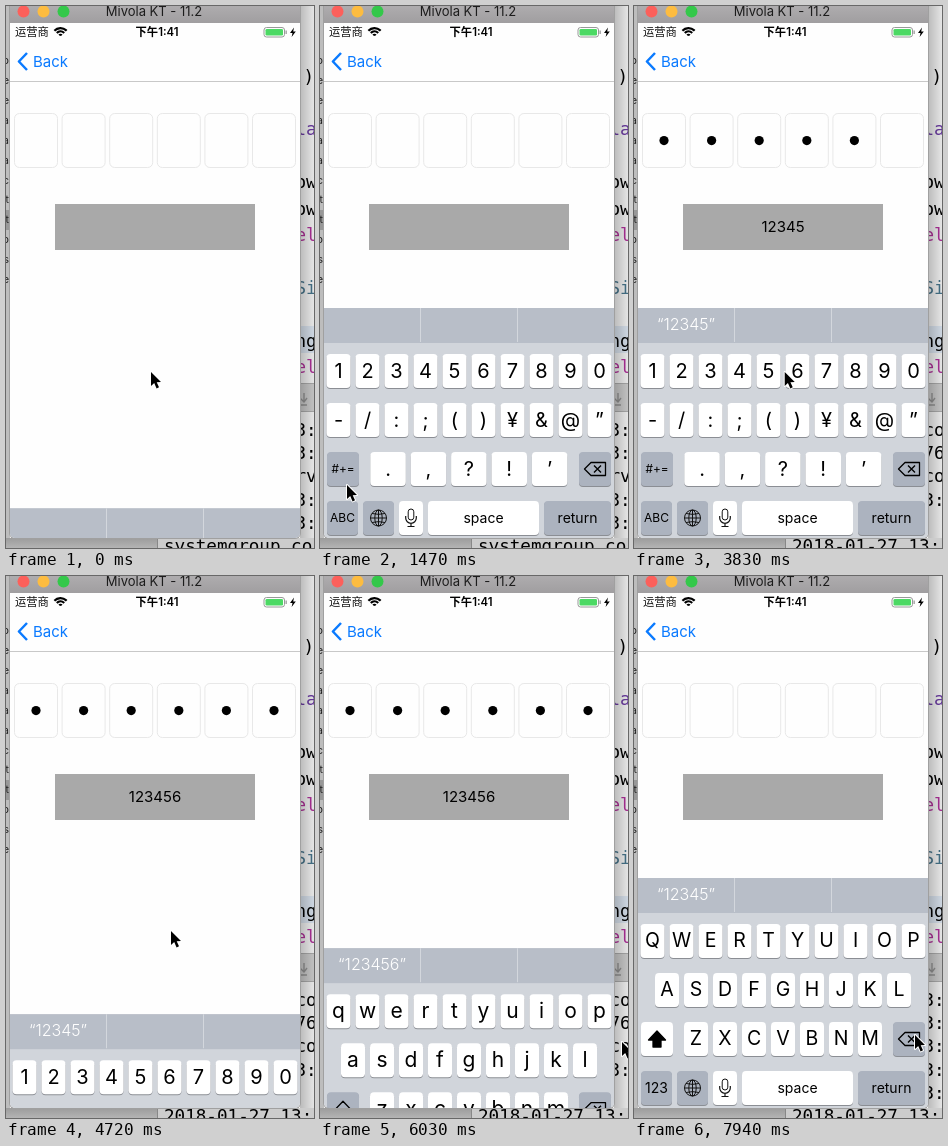
Animation, 308 px wide and 542 px high, one loop 8000 ms. Source, as an HTML page with a canvas:

```html
<!DOCTYPE html>
<html lang="en">
<head>
<meta charset="utf-8">
<title>Passcode field demo</title>
<style>
html, body { margin: 0; width: 100%; height: 100%; overflow: hidden; background: #ddd; }
canvas { display: block; width: 308px; height: 542px; }
</style>
</head>
<body>
<canvas id="stage" width="308" height="542"></canvas>
<script>
const c = document.getElementById('stage').getContext('2d');
const UI = 'Inter, "Noto Sans CJK SC", "Noto Sans CJK", sans-serif';
const MONO = '"DejaVu Sans Mono", monospace';
const LOOP = 8000, STEP = 147.2;
const KEY_TOP = 302, KEY_H = 230;
const ERASE = 6900;                // backspace goes down
const GREY = '#acb3bf';

// time, x, y of the pointer tip
const PATH = [
  [0, 145, 366], [1100, 18, 508], [1472, 27, 479], [1860, 20, 366], [4260, 163, 366],
  [4720, 165, 355], [5290, 150, 172], [5740, 152, 145], [6035, 302, 466], [6450, 281, 459]
];

function text(s, x, y, size, color = '#000', align = 'center', weight = 400, font = UI) {
  c.font = `${weight} ${size}px ${font}`;
  c.textAlign = align;
  c.textBaseline = 'middle';
  c.fillStyle = color;
  c.fillText(s, x, y);
}
function mono(s, x, y, color = '#000') {
  text(s, x, y, 17.6, color, 'left', 400, MONO);
}
function rect(x, y, w, h, color) {
  c.fillStyle = color;
  c.fillRect(x, y, w, h);
}
function round(x, y, w, h, r, fill, line) {
  c.beginPath();
  c.roundRect(x, y, w, h, r);
  if (fill) { c.fillStyle = fill; c.fill(); }
  if (line) stroke(line, 1);
}
function disc(x, y, r, color) {
  c.beginPath();
  c.arc(x, y, r, 0, 7);
  c.fillStyle = color;
  c.fill();
}
function poly(points, close = true) {
  c.beginPath();
  points.forEach(([x, y]) => c.lineTo(x, y));
  if (close) c.closePath();
}
function stroke(color, width) {
  c.strokeStyle = color;
  c.lineWidth = width;
  c.lineJoin = 'round';
  c.stroke();
}
function fade(x0, y0, x1, y1, from, to) {
  const g = c.createLinearGradient(x0, y0, x1, y1);
  g.addColorStop(0, from);
  g.addColorStop(1, to);
  return g;
}
const clamp = (v, lo, hi) => Math.min(hi, Math.max(lo, v));

// One digit per 480 ms going in, one per 150 ms while backspace repeats.
function digitsAt(t) {
  if (t < ERASE) return clamp(Math.floor((t - 1380) / 480), 0, 6);
  return clamp(5 - Math.floor((t - ERASE - 250) / 150), 0, 5);
}
function pointerAt(t) {
  const i = PATH.findIndex(p => p[0] > t);
  if (i < 0) return PATH[PATH.length - 1].slice(1);
  const [t0, x0, y0] = PATH[i - 1], [t1, x1, y1] = PATH[i];
  const p = (t - t0) / (t1 - t0), e = p * p * (3 - 2 * p);
  return [x0 + (x1 - x0) * e, y0 + (y1 - y0) * e];
}
function slide(t, start) {
  return 1 - (1 - clamp((t - start) / 400, 0, 1)) ** 3;
}
function keyboardShift(t) {
  if (t < 4000) return KEY_H * (1 - slide(t, -18));
  if (t < 5400) return KEY_H * slide(t, 4607);
  return KEY_H * (1 - slide(t, 5904.5));
}

function editor() {
  const colors = { la: '#703daa', el: '#b833a1', Si: '#4b7b93' };
  rect(0, 0, 308, 542, '#fff');
  rect(294, 320, 14, 27, '#e4eefa');
  rect(294, 377, 14, 29, '#b4b4b4');
  rect(294, 378, 14, 27, '#d6d6d6');
  ') ,,la,,ow,ow,el,,Si,,ng,el'.split(',').forEach((s, i) =>
    mono(s, s == ') ' ? 297.5 : 289.5, 72 + i * 26.4, colors[s]));
  c.beginPath();
  c.moveTo(298, 387); c.lineTo(298, 395);
  c.moveTo(294, 392); c.lineTo(298, 396); c.lineTo(301, 392);
  c.moveTo(294, 399); c.lineTo(301, 399);
  stroke('#999', 1.4);
}
function consoleLog(t, n) {
  const late = t > 3000;
  const skip = t > ERASE && n < 5 ? Math.min(5, 6 - n) : 0;
  const log = (late ? 'co,76,co,3:,,3:,3:,3:,3:,3:' : '3:,3:,rv,3:,3:').split(',');
  log.slice(skip, skip + 5).forEach((s, i) => mono(s, 289.5, 425 + i * 23.4));
  mono(late ? '2018-01-27 13:' : 'systemgroup.co', 158, 541);
}
function backdrop(t, n) {
  editor();
  consoleLog(t, n);
  rect(294, 0, 14, 532, fade(294, 0, 310, 0, 'rgba(0,0,0,.27)', 'rgba(0,0,0,.08)'));
  rect(152, 532, 156, 10, 'rgba(0,0,0,.2)');
  rect(0, 532, 152, 10, fade(0, 532, 0, 542, '#9c9c9c', '#b4b4b4'));
  rect(151, 532, 1, 10, '#888');
  rect(0, 0, 4, 532, '#bdbdbd');
  rect(0, 204, 4, 20, '#989898');
  [...'peeaaacttbse'].forEach((s, i) => text(s, 3, 55 + i * 19.9, 10.5, '#222', 'right'));
}

function statusBar() {
  text('运营商', 9, 26.5, 11.3, '#111', 'left');
  for (let r = 1.8; r < 9; r += 3.3) {
    c.beginPath();
    c.arc(54.5, 30.5, r, -Math.PI * 0.76, -Math.PI * 0.24);
    stroke('#000', 2.1);
  }
  text('下午1:41', 151, 26.5, 11.3, '#000', 'center', 600);
  round(258, 21.5, 20.5, 9.5, 2.5, null, '#999');
  round(259.5, 23, 17.5, 6.5, 1.3, '#4cd964');
  rect(279.5, 24.5, 1.3, 3.5, '#999');
  poly([[288, 21.5], [284, 27], [286.5, 27], [285.6, 31], [289.8, 25.4], [287.2, 25.4]]);
  c.fillStyle = '#000';
  c.fill();
}

function phone(n) {
  round(3, 0, 292, 533, [0, 0, 6, 6], '#a0a0a0');
  rect(4, 0, 290, 17, fade(0, 0, 0, 17, '#aeacae', '#a09ea0'));
  ['#fc605b', '#fdbc40', '#34c84a'].forEach((color, i) => disc(17.5 + i * 20, 5.5, 6, color));
  text('Mivola KT - 11.2', 148, 6.5, 13, '#1c1c1c');
  round(4, 17, 290, 515, [0, 0, 5, 5], '#fefefe');
  rect(4, 75, 290, 1, '#c8c8c8');
  statusBar();
  poly([[21, 47], [12.9, 55.5], [21, 64]], false);
  stroke('#0a7aff', 2.5);
  text('Back', 27, 56, 15, '#0a7aff', 'left');

  for (let i = 0; i < 6; i++) {
    const x = 8.5 + i * 47.6;
    round(x, 107.5, 43, 54, 5, '#fefefe', '#e8e8e8');
    if (i < n) disc(x + 21.5, 134.6, 4.6, '#000');
  }
  rect(49, 198, 200, 46, '#a9a9a9');
  text('123456'.slice(0, n), 149, 221.5, 15);
}

function key(x, y, w, label, size, fill = '#fff') {
  round(x, y + 1, w, 34, 4, '#8b8e94');
  round(x, y, w, 34, 4, fill);
  if (label) text(label, x + w / 2, y + 17.5, size);
}
function keyRow(keys, row, size) {
  const pitch = 29, x = 149 - keys.length * pitch / 2 + 2.5;
  [...keys].forEach((k, i) => key(x + i * pitch, 348 + row * 49, 24, k, size));
}

function globe(x, y) {
  c.beginPath();
  c.arc(x, y, 8, 0, 7);
  c.moveTo(x + 3.7, y);
  c.ellipse(x, y, 3.7, 8, 0, 0, 7);
  c.moveTo(x, y - 8); c.lineTo(x, y + 8);
  c.moveTo(x - 8, y); c.lineTo(x + 8, y);
  for (const s of [-1, 1]) {
    c.moveTo(x - 6.5, y + 4.5 * s);
    c.quadraticCurveTo(x, y + 2.8 * s, x + 6.5, y + 4.5 * s);
  }
  stroke('#111', 1);
}
function mic(x, y) {
  round(x - 2.8, y - 9, 5.6, 11, 2.8, null, '#111');
  c.beginPath();
  c.moveTo(x - 5.3, y - 2);
  c.arc(x, y, 5.3, Math.PI, 0, true);
  c.lineTo(x + 5.3, y - 2);
  c.moveTo(x, y + 5.3); c.lineTo(x, y + 8.5);
  c.moveTo(x - 3.5, y + 8.5); c.lineTo(x + 3.5, y + 8.5);
  stroke('#111', 1.2);
}
function shiftIcon(solid) {
  poly([[23, 455], [31.5, 464], [27, 464], [27, 471], [19, 471], [19, 464], [14.5, 464]]);
  c.fillStyle = '#000';
  if (solid) c.fill();
  stroke('#000', 1.3);
}
function deleteIcon(solid) {
  poly([[264.5, 463], [271, 456.5], [285.5, 456.5], [285.5, 469.5], [271, 469.5]]);
  c.fillStyle = '#000';
  if (solid) c.fill();
  stroke('#000', 1.3);
  c.beginPath();
  c.moveTo(274, 459.5); c.lineTo(281, 466.5);
  c.moveTo(281, 459.5); c.lineTo(274, 466.5);
  stroke(solid ? '#fff' : '#000', 1.4);
}

function suggestion(t, n) {
  const count = t >= ERASE ? 5 : t > 5400 ? 6 : Math.min(n, 5);
  if (!count) return;
  // the closing quote lags behind the first erased digit
  const gap = t >= ERASE && n == 5 ? '\u2002' : '';
  text('“' + '123456'.slice(0, count) + gap + '”', 52, 319, 16, '#fff', 'center', 300);
}

function keyboard(t, n) {
  const shift = keyboardShift(t);
  if (shift >= KEY_H) return;
  const numbers = t > 1300 && t < 5400;
  const caps = n == 0;
  const held = t >= ERASE && n > 1;
  c.save();
  c.beginPath();
  c.roundRect(4, 17, 290, 515, [0, 0, 5, 5]);
  c.clip();
  c.translate(0, shift);
  rect(4, KEY_TOP, 290, KEY_H, '#d1d5db');
  rect(4, KEY_TOP, 290, 35, '#b8bec8');
  rect(100, KEY_TOP, 1, 34, '#d3d7dd');
  rect(197, KEY_TOP, 1, 34, '#d3d7dd');
  suggestion(t, n);

  if (numbers) {
    ['1234567890', '-/:;()¥&@”'].forEach((keys, row) => keyRow(keys, row, 20));
    [...'.,?!’'].forEach((k, i) => key(50.3 + i * 40.4, 446, 35.5, k, 20));
    key(7, 446, 32, '#+=', 11.8, GREY);
  } else {
    ['qwertyuiop', 'asdfghjkl', 'zxcvbnm'].forEach((keys, row) =>
      keyRow(caps ? keys.toUpperCase() : keys, row, caps ? 19.5 : 21));
    key(7, 446, 32, '', 0, caps ? '#fff' : GREY);
    shiftIcon(caps);
  }
  key(259, 446, 32, '', 0, held ? '#fff' : GREY);
  deleteIcon(held);
  key(7, 495, 31, numbers ? 'ABC' : '123', numbers ? 12 : 14, GREY);
  key(43, 495, 31, '', 0, GREY);
  globe(58.5, 512);
  key(79, 495, 24);
  mic(91, 512);
  key(108, 495, 111, 'space', 14);
  key(224, 495, 67, 'return', 14, GREY);
  c.restore();
}

function pointer(x, y) {
  c.save();
  c.translate(x, y);
  poly([[0, 0], [0, 14], [3.2, 11], [5.6, 16.4], [8, 15.3], [5.7, 10.2], [10, 10]]);
  stroke('#fff', 2);
  c.fillStyle = '#000';
  c.fill();
  c.restore();
}

function draw(now) {
  const t = Math.floor((now % LOOP + 10) / STEP) * STEP;
  const n = digitsAt(t);
  backdrop(t, n);
  phone(n);
  keyboard(t, n);
  pointer(...pointerAt(t));
  requestAnimationFrame(draw);
}
requestAnimationFrame(draw);
</script>
</body>
</html>
```
